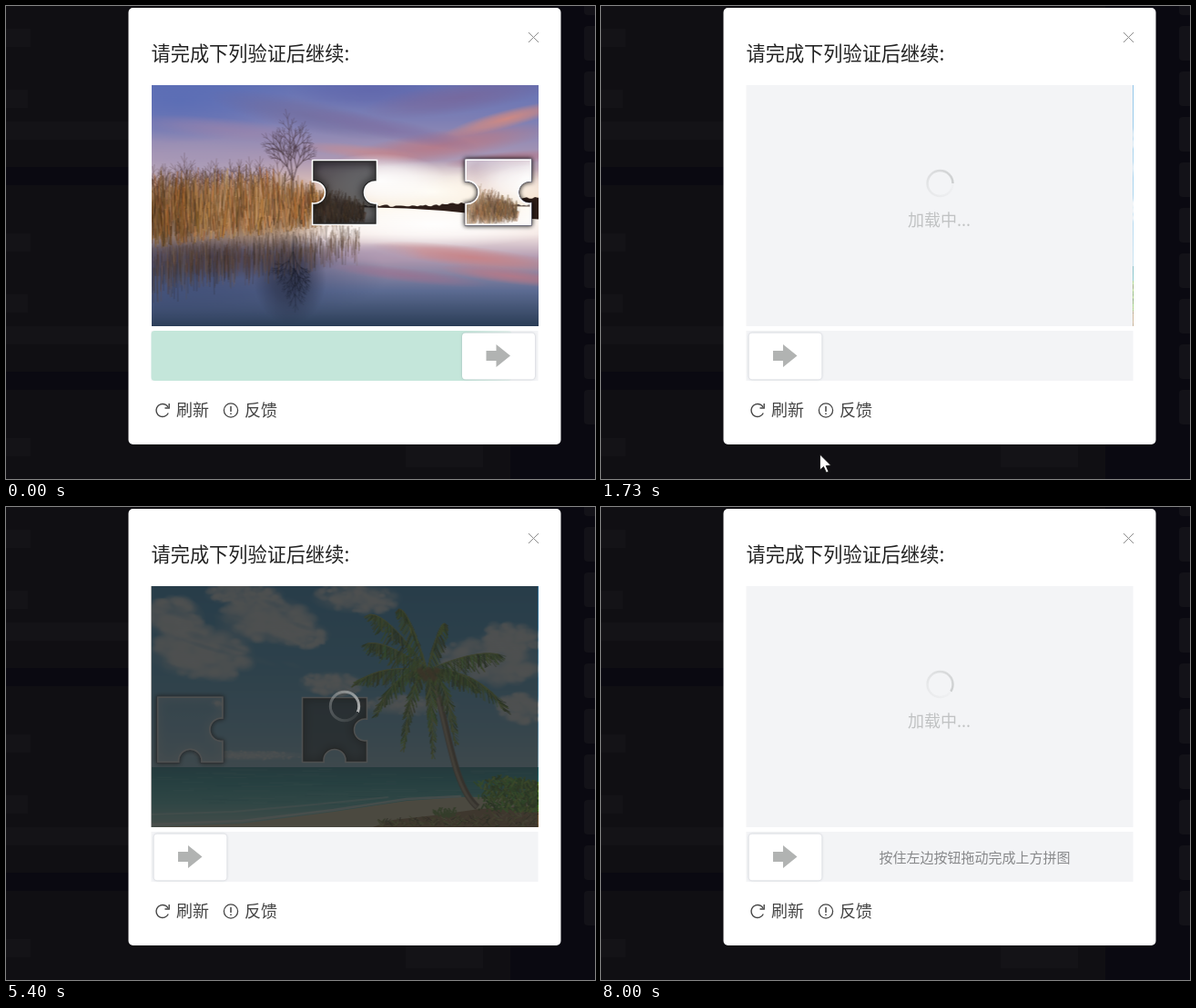
An HTML page with a canvas that plays this animation: 647x520 px, repeating every 8070 ms.

```html
<!DOCTYPE html>
<html lang="zh">
<head>
<meta charset="utf-8">
<title>滑块验证</title>
<style>
html, body { margin: 0; width: 100%; height: 100%; overflow: hidden; background: #100f14; }
canvas { display: block; }
</style>
</head>
<body>
<canvas id="stage" width="647" height="520"></canvas>
<script>
const LOOP = 8070, STEP = 1000 / 15, TAU = Math.PI * 2;
const PHOTO = { x: 159.5, y: 87, w: 425, h: 265 };
const FONT = '"Noto Sans CJK SC", "Noto Sans CJK", "Noto Sans", sans-serif';
const ctx = document.getElementById('stage').getContext('2d');

let seed = 7;
const rnd = (a = 0, b = 1) => {
  seed = (seed * 1664525 + 1013904223) % 4294967296;
  return a + (b - a) * seed / 4294967296;
};

// ---------- helpers ----------
function rect(c, x, y, w, h, fill) {
  c.fillStyle = fill;
  c.fillRect(x, y, w, h);
}

function roundRect(x, y, w, h, r, fill) {
  ctx.beginPath();
  ctx.roundRect(x, y, w, h, r);
  ctx.fillStyle = fill;
  ctx.fill();
}

function line(c, points, color, width = 1) {
  c.beginPath();
  points.forEach(([x, y]) => c.lineTo(x, y));
  c.strokeStyle = color;
  c.lineWidth = width;
  c.stroke();
}

function polygon(c, points, fill) {
  c.beginPath();
  points.forEach(([x, y]) => c.lineTo(x, y));
  c.fillStyle = fill;
  c.fill();
}

function ring(x, y, r, color, width, from = 0, to = TAU) {
  ctx.beginPath();
  ctx.arc(x, y, r, from, to);
  ctx.strokeStyle = color;
  ctx.lineWidth = width;
  ctx.stroke();
}

function text(str, x, y, size, color, align = 'left') {
  ctx.font = `300 ${size}px ${FONT}`;
  ctx.textAlign = align;
  ctx.fillStyle = color;
  ctx.fillText(str, x, y);
}

function vertical(c, y0, y1, ...stops) {
  const g = c.createLinearGradient(0, y0, 0, y1);
  stops.forEach(([at, color]) => g.addColorStop(at, color));
  rect(c, PHOTO.x, y0, PHOTO.w, y1 - y0, g);
}

function blob(c, x, y, rx, ry, rgb, alpha, tilt = 0) {
  const g = c.createRadialGradient(0, 0, 0, 0, 0, 1);
  g.addColorStop(0, `rgba(${rgb},${alpha})`);
  g.addColorStop(0.5, `rgba(${rgb},${alpha * 0.65})`);
  g.addColorStop(1, `rgba(${rgb},0)`);
  c.save();
  c.translate(x, y);
  c.rotate(tilt);
  c.scale(rx, ry);
  rect(c, -1, -1, 2, 2, g);
  c.restore();
}

function paint(draw) {
  const canvas = document.createElement('canvas');
  canvas.width = PHOTO.w;
  canvas.height = PHOTO.h;
  const c = canvas.getContext('2d');
  c.translate(-PHOTO.x, -PHOTO.y);
  draw(c);
  return canvas;
}

// ---------- pictures ----------
function branch(c, x, y, len, angle, depth, color) {
  const x2 = x + Math.cos(angle) * len, y2 = y + Math.sin(angle) * len;
  line(c, [[x, y], [x2, y2]], color, 0.5 + depth * 0.3);
  if (!depth) return;
  branch(c, x2, y2, len * 0.84, angle + rnd(-0.12, 0.12), depth - 1, color);
  for (const turn of [-0.5, 0.5])
    branch(c, x2, y2, len * rnd(0.5, 0.72), angle + turn + rnd(-0.2, 0.2), depth - 1, color);
}

const lake = paint(c => {
  vertical(c, 87, 222, [0, '#6472b4'], [0.3, '#7f80b4'], [0.6, '#ab98b4'], [0.85, '#e4c6b8'], [1, '#f6dcb8']);
  [[190, 105, 130, 45, '84,106,182', 0.7], [400, 92, 90, 22, '96,100,170', 0.7],
   [330, 120, 110, 18, '112,104,152', 0.6, 0.2], [500, 100, 110, 18, '122,100,150', 0.7, -0.15],
   [480, 153, 120, 17, '190,116,124', 0.75, -0.15], [550, 124, 70, 10, '226,140,120', 0.8, -0.25],
   [420, 135, 100, 12, '125,108,160', 0.6, 0.2], [390, 160, 70, 8, '205,138,140', 0.6, 0.1],
   [240, 135, 100, 12, '158,132,170', 0.6, 0.1], [210, 178, 90, 30, '160,150,184', 0.6],
   [470, 204, 130, 34, '255,253,246', 1], [410, 192, 75, 30, '255,255,255', 0.95],
   [550, 200, 90, 22, '255,246,232', 0.8], [550, 168, 70, 8, '176,112,130', 0.7, -0.1]
  ].forEach(b => blob(c, ...b));

  vertical(c, 222, 352, [0, '#fff8ec'], [0.22, '#f5e8e4'], [0.42, '#b29ab0'], [0.7, '#5c6b92'], [1, '#2b3d56']);
  [[190, 295, 230, 60, '58,72,112', 0.9], [470, 240, 140, 26, '255,255,255', 0.95],
   [510, 276, 110, 12, '204,128,128', 0.8, 0.12], [555, 297, 80, 9, '196,118,128', 0.7, 0.12],
   [440, 296, 90, 8, '160,110,140', 0.6, 0.12], [400, 272, 60, 12, '170,150,176', 0.7],
   [230, 276, 150, 24, '66,54,62', 0.75], [312, 300, 40, 50, '34,38,56', 0.7]
  ].forEach(b => blob(c, ...b));

  // far shore
  const shore = [[385, 221]];
  for (let x = 395; x <= 590; x += 3)
    shore.push([x, 219.5 - Math.max(0, x - 465) * 0.075 + rnd(-1.2, 1.2)]);
  polygon(c, [...shore, [590, 235], [540, 231], [480, 225], [440, 222.5]], '#2d1d18');

  // bare trees and their reflection
  for (let i = 0; i < 24; i++)
    branch(c, 160 + i * 6 + rnd(-3, 3), 220, rnd(11, 20), -1.57 + rnd(-0.1, 0.1), 3, 'rgba(84,62,66,.6)');
  branch(c, 316, 218, 26, -1.6, 5, 'rgba(72,54,62,.55)');
  branch(c, 316, 248, 22, 1.6, 5, 'rgba(26,28,42,.45)');

  // reeds
  [[200, 228, 110, 48, '120,84,56', 1], [285, 226, 80, 44, '136,94,56', 1], [368, 226, 30, 18, '120,84,58', 0.9]]
    .forEach(b => blob(c, ...b));
  for (let i = 0; i < 1900; i++) {
    const u = rnd(), x = 159 + u * 234;
    const fall = Math.max(0, u - 0.55) / 0.45;
    const foot = 268 - u * 30, room = 88 - u * 20 - fall * 42;
    const base = foot - rnd(0, room * 0.55), height = rnd(0.12, 0.5) * room;
    const light = rnd(18, 60) * (0.72 + 0.4 * Math.sin(Math.PI * Math.min(1, u * 1.1)));
    line(c, [[x, base], [x + rnd(-4, 4), base - height]],
      `hsla(${rnd(22, 36)},${rnd(30, 62)}%,${light}%,.6)`, rnd(0.5, 1.4));
  }
  branch(c, 366, 232, 10, -1.57, 3, 'rgba(110,76,54,.7)');
  for (let i = 0; i < 700; i++) {
    const u = rnd(), x = 159 + u * 230, y = 264 - u * 28 + rnd(0, 26);
    line(c, [[x, y], [x + rnd(-2, 2), y + rnd(8, 44) * (1 - u * 0.4)]],
      `hsla(${rnd(15, 35)},${rnd(15, 40)}%,${rnd(12, 40)}%,.28)`);
  }
});

function cloud(c, x, y, w, h) {
  blob(c, x, y, w, h, '255,255,255', 0.85);
  for (let i = 0; i < 110; i++) {
    const a = rnd(0, TAU), d = Math.sqrt(rnd()) * 0.85, r = rnd(0.1, 0.26) * h;
    blob(c, x + Math.cos(a) * d * w, y + Math.sin(a) * d * h + Math.cos(a) * d * h * 0.25,
      r * 1.9, r * 1.3, '255,255,255', rnd(0.3, 0.7));
  }
}

function frond(c, x0, y0, x1, y1) {
  const cx = (x0 + x1) / 2 + (x1 - x0) * 0.18, cy = Math.min(y0, y1) - 8 + Math.abs(y1 - y0) * 0.12;
  for (let i = 0; i <= 50; i++) {
    const u = i / 50, v = 1 - u;
    const x = v * v * x0 + 2 * u * v * cx + u * u * x1;
    const y = v * v * y0 + 2 * u * v * cy + u * u * y1;
    const len = 4 + 17 * Math.sin(Math.PI * Math.min(1, u * 0.85 + 0.1));
    for (const side of [-0.5, 0.6])
      line(c, [[x, y], [x + side * len * 0.5 + (x1 - x0) * 0.08, y + len * rnd(0.3, 0.95)]],
        `hsl(${rnd(66, 100)},${rnd(45, 70)}%,${rnd(18, 52)}%)`, rnd(0.6, 1.4));
  }
  c.beginPath();
  c.moveTo(x0, y0);
  c.quadraticCurveTo(cx, cy, x1, y1);
  c.strokeStyle = '#a9bb4c';
  c.lineWidth = 1;
  c.stroke();
}

const beach = paint(c => {
  vertical(c, 87, 286, [0, '#3499dc'], [0.45, '#52b0e5'], [0.8, '#80c5ec'], [1, '#a9d8ee']);
  [[215, 160, 60, 32], [186, 122, 34, 24], [286, 124, 58, 28], [262, 96, 46, 14], [385, 100, 52, 18],
   [322, 140, 36, 16], [530, 168, 62, 28], [556, 144, 36, 18], [358, 194, 38, 14], [566, 222, 30, 18],
   [440, 218, 60, 12], [265, 273, 70, 6]
  ].forEach(b => cloud(c, ...b));
  for (let i = 0; i < 12; i++)
    blob(c, rnd(170, 330), rnd(105, 175), rnd(12, 30), rnd(3, 7), '120,190,232', 0.4, 0.3);

  vertical(c, 286, 352, [0, '#238c9c'], [0.25, '#2ba9ad'], [0.6, '#5ecbc5'], [0.85, '#a0e0d4'], [1, '#cfead8']);
  for (let i = 0; i < 90; i++) {
    const x = rnd(150, 570), y = rnd(288, 328);
    line(c, [[x, y], [x + rnd(10, 50), y]], `rgba(${rnd() < 0.5 ? '20,130,150' : '170,235,225'},.2)`);
  }
  polygon(c, [[159, 352], [260, 348], [360, 335], [440, 323], [500, 319], [590, 319], [590, 353], [159, 353]], '#efdcaa');
  line(c, [[159, 349], [260, 345], [360, 333], [440, 321], [500, 318]], 'rgba(255,255,245,.7)', 2.5);
  line(c, [[159, 338], [250, 335], [340, 327], [420, 319]], 'rgba(240,255,248,.45)', 2);
  polygon(c, [[400, 353], [425, 344], [470, 339], [520, 332], [590, 328], [590, 353]], '#ad7d48');
  for (let i = 0; i < 320; i++) {
    const x = rnd(410, 585), y = rnd(336 + (585 - x) * 0.06, 352);
    line(c, [[x, y], [x + rnd(-6, 6), y - rnd(1, 5)]], `hsl(${rnd(25, 75)},45%,${rnd(20, 65)}%)`);
  }

  // trunk
  for (const [color, width, dx] of [['#7d6247', 7, 0], ['#c2a57f', 3, -1.2]]) {
    c.beginPath();
    c.moveTo(466 + dx, 182);
    c.bezierCurveTo(484 + dx, 222, 488 + dx, 305, 518 + dx, 330);
    c.strokeStyle = color;
    c.lineWidth = width;
    c.stroke();
  }
  [[469, 272], [437, 264], [493, 258], [408, 228], [546, 222], [387, 192], [516, 200],
   [541, 162], [397, 150], [482, 128], [400, 118], [432, 112]
  ].forEach(([x, y]) => frond(c, 463, 179, x, y));
  for (let i = 0; i < 7; i++) blob(c, 455 + i * 3, 180 + i % 3 * 4, 5, 5, '150,100,40', 1);

  // shrubs
  for (let i = 0; i < 650; i++) {
    const x = 515 + Math.sqrt(rnd()) * 72, y = rnd(299 + Math.abs(x - 545) * 0.15, 336);
    line(c, [[x, y], [x + rnd(-6, 6), y - rnd(2, 7)]], `hsl(${rnd(74, 106)},65%,${rnd(22, 56)}%)`, 1.6);
  }
  for (let i = 0; i < 50; i++) {
    const x = rnd(472, 495), y = rnd(334, 342);
    line(c, [[x, y], [x + rnd(-4, 4), y - 4]], '#709634', 1.3);
  }
});

// ---------- puzzle ----------
const SIZE = 71, RIGHT = 0, BOTTOM = 1, LEFT = 2;
const scenes = [
  { photo: lake, hole: [336.5, 169.5], piece: [166, 168.5], notches: [RIGHT, LEFT] },
  { photo: beach, hole: [325.5, 209.5], piece: [166, 208.5], notches: [RIGHT, BOTTOM] }
];

function puzzlePath(notches, size) {
  const h = size / 2, r = 12, open = Math.acos(2 / r);
  const path = new Path2D();
  path.moveTo(0, 0);
  [[size, 0], [size, size], [0, size]].forEach(([x, y], side) => {
    path.lineTo(x, y);
    const mid = side * Math.PI / 2;
    if (notches.includes(side))
      path.arc(h + (h - 2) * Math.cos(mid), h + (h - 2) * Math.sin(mid), r, mid - open, mid + open, true);
  });
  path.closePath();
  return path;
}

function drawScene({ photo, hole, piece, notches }, slide) {
  ctx.drawImage(photo, PHOTO.x, PHOTO.y);

  const gap = puzzlePath(notches, SIZE);
  ctx.save();
  ctx.translate(...hole);
  ctx.fillStyle = 'rgba(30,32,36,.68)';
  ctx.fill(gap);
  ctx.save();
  ctx.clip(gap);
  ctx.shadowColor = '#000';
  ctx.shadowBlur = 10;
  ctx.strokeStyle = '#222';
  ctx.lineWidth = 4;
  ctx.stroke(gap);
  ctx.restore();
  ctx.strokeStyle = '#fff';
  ctx.lineWidth = 1.6;
  ctx.stroke(gap);
  ctx.restore();

  const tile = puzzlePath(notches, SIZE + 1.5);
  ctx.save();
  ctx.translate(piece[0] + slide, piece[1]);
  ctx.shadowColor = 'rgba(0,0,0,.9)';
  ctx.shadowBlur = 5;
  ctx.fillStyle = ctx.strokeStyle = '#667';
  ctx.fill(tile);
  ctx.lineWidth = 1.5;
  ctx.stroke(tile);
  ctx.clip(tile);
  ctx.shadowBlur = 0;
  ctx.drawImage(photo, PHOTO.x - hole[0], PHOTO.y - hole[1]);
  rect(ctx, 0, 0, 80, 80, 'rgba(255,255,255,.12)');
  ctx.shadowColor = '#fff';
  ctx.shadowBlur = 11;
  ctx.strokeStyle = '#fff';
  ctx.lineWidth = 3;
  ctx.stroke(tile);
  ctx.restore();
}

// ---------- interface ----------
function drawBackdrop() {
  rect(ctx, 0, 0, 647, 520, '#100f13');
  rect(ctx, 554, 0, 93, 520, '#0a0911');
  for (const y of [0, 225, 450]) {
    rect(ctx, 0, y + 25, 27, 20, '#141317');
    rect(ctx, 0, y + 92, 24, 20, '#141317');
    rect(ctx, 0, y + 127, 140, 20, '#141317');
    rect(ctx, 0, y + 177, 140, 20, '#0a0911');
  }
  for (let y = -28; y < 460; y += 50) roundRect(635, y, 20, 38, 4, '#131218');
  rect(ctx, 439, 480, 85, 27, '#141317');
}

function drawDialog() {
  roundRect(134.5, 2, 475, 480, 5, '#fff');
  text('请完成下列验证后继续:', 159.5, 60, 21.2, '#222');
  line(ctx, [[574, 29], [585, 40]], '#8c8c8c');
  line(ctx, [[585, 29], [574, 40]], '#8c8c8c');

  const ink = '#444';
  ring(172, 444.5, 7, ink, 1.4, 0.45, TAU - 0.55);
  line(ctx, [[179.2, 437], [179.2, 442], [174.5, 442]], ink, 1.4);
  text('刷新', 187, 451, 18, ink);
  ring(247, 444.5, 7.6, ink, 1.3);
  line(ctx, [[247, 440], [247, 446]], ink, 1.5);
  line(ctx, [[247, 447.5], [247, 449]], ink, 1.5);
  text('反馈', 262, 451, 18, ink);
}

function drawSlider(slide, hint) {
  rect(ctx, 159.5, 357, 425, 55, '#f3f4f6');
  if (slide) {
    const g = ctx.createLinearGradient(500, 0, 556, 0);
    g.addColorStop(0, '#c4e6da');
    g.addColorStop(1, '#e6f2ee');
    roundRect(159.5, 357, 396, 55, 4, g);
  }
  if (hint) text('按住左边按钮拖动完成上方拼图', 305.5, 391, 15, '#88898b');
  ctx.save();
  ctx.translate(slide, 0);
  ctx.shadowColor = 'rgba(90,100,120,.4)';
  ctx.shadowBlur = 2.5;
  roundRect(162.5, 359.5, 80, 51, 4, '#fff');
  ctx.shadowBlur = 0;
  polygon(ctx, [[189, 379], [200, 379], [200, 372], [215.5, 384.5], [200, 397], [200, 390], [189, 390]], '#b1b3b2');
  ctx.restore();
}

function spinner(x, y, r, width, rgb, angle) {
  const g = ctx.createConicGradient(angle, x, y);
  g.addColorStop(0, `rgba(${rgb},.08)`);
  g.addColorStop(0.4, `rgba(${rgb},.3)`);
  g.addColorStop(1, `rgba(${rgb},1)`);
  ring(x, y, r, g, width);
}

const turn = ms => ms / 1000 * TAU;

function drawShade() {
  rect(ctx, PHOTO.x, PHOTO.y, PHOTO.w, PHOTO.h, 'rgba(38,40,40,.81)');
}

function drawChecking(ms, start) {
  drawShade();
  spinner(372, 219, 15.7, 3, '178,180,180', turn(ms) + start);
}

function drawFailure() {
  drawShade();
  ring(372, 183.5, 16.5, '#fff', 2);
  line(ctx, [[365, 176.5], [379, 190.5]], '#fff', 2);
  line(ctx, [[379, 176.5], [365, 190.5]], '#fff', 2);
  text('验证失败，请根据提示重新', 372, 232, 17.6, '#fff', 'center');
  text('操作', 372, 256, 17.6, '#fff', 'center');
}

function drawLoading(ms) {
  rect(ctx, PHOTO.x, PHOTO.y, PHOTO.w, PHOTO.h, '#f3f4f6');
  spinner(372.5, 195, 14, 2.5, '204,206,207', turn(ms));
  text('加载中...', 371.5, 242, 18, '#c0c2c3', 'center');
}

function drawCursor(x, y) {
  const shape = [[0, 0], [0, 17], [4, 13.5], [7, 20], [9.5, 19], [6.7, 12.5], [12, 12], [0, 0]];
  ctx.save();
  ctx.translate(x, y);
  polygon(ctx, shape, '#fff');
  line(ctx, shape, '#111', 0.8);
  ctx.restore();
}

// pointer leaving the stage: [from, until, x, y]
const pointer = [[1730, 1800, 240.5, 493], [1800, 1870, 178, 498], [1870, 2130, 130, 495], [2130, 2200, 124.5, 504]];

function render(now) {
  const t = now % LOOP;
  const held = Math.floor((t + 4) / STEP) * STEP;
  const slide = t < 70 ? 338.5 : 0;
  const hint = (t >= 1800 && t < 3730) || t >= 7870;

  drawBackdrop();
  drawDialog();
  drawSlider(slide, hint);
  if (t < 7870) drawScene(scenes[t < 1730 ? 0 : 1], slide);

  if (t >= 400 && t < 730) drawChecking(held - 400, 0.1);
  else if (t >= 730 && t < 1730) drawFailure();
  else if (t >= 1730 && t < 1870) drawLoading(held - 1730);
  else if (t >= 5400 && t < 6800) drawChecking(held - 5400, 0.4);
  else if (t >= 6800 && t < 7800) drawFailure();
  else if (t >= 7800) drawLoading(held - 7905);

  const spot = pointer.find(([from, until]) => t >= from && t < until);
  if (spot) drawCursor(spot[2], spot[3]);
}

const begin = performance.now();
function tick() {
  render(performance.now() - begin);
  requestAnimationFrame(tick);
}
tick();
</script>
</body>
</html>
```
